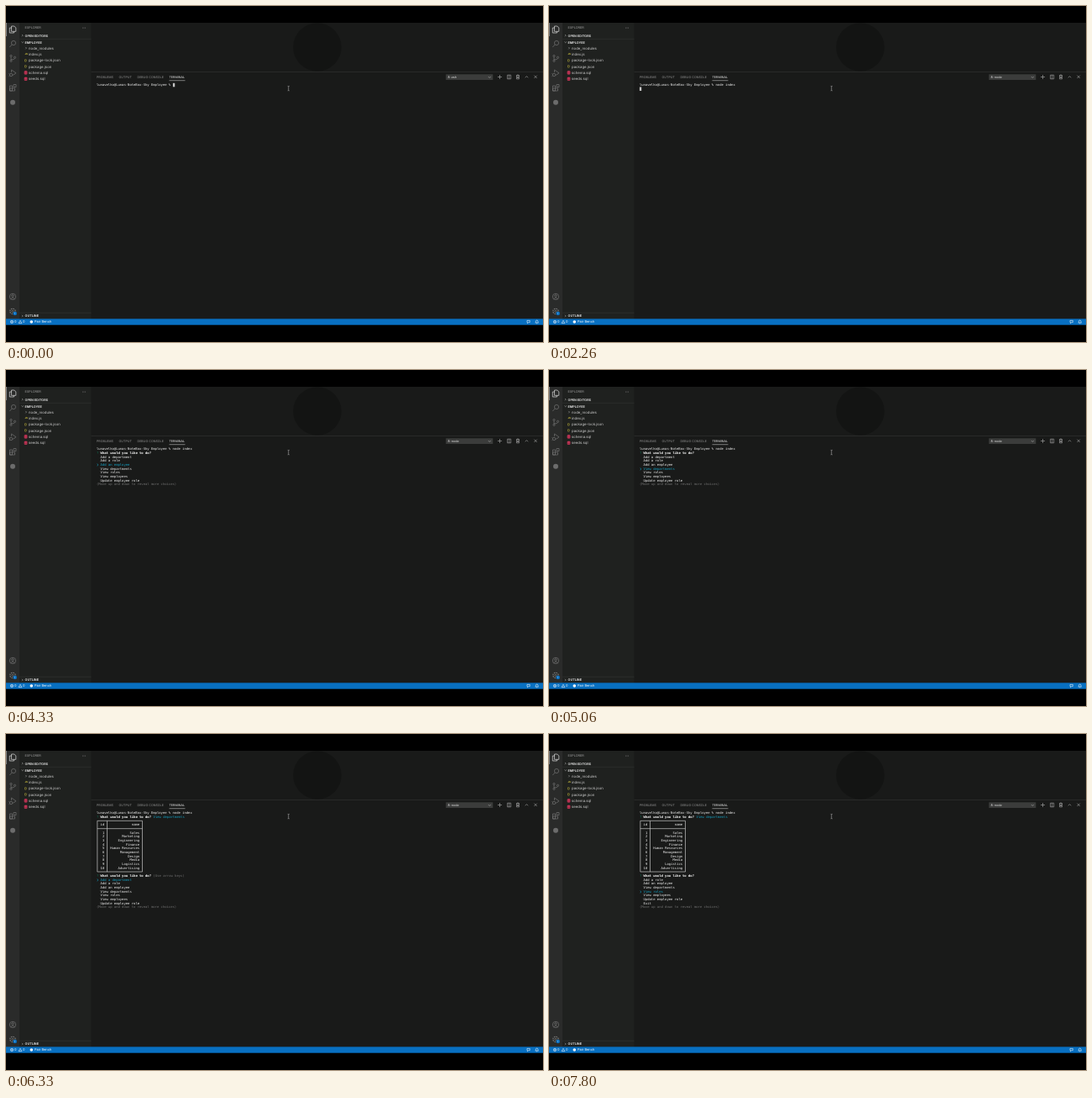
An HTML page for the animation above (8 s loop, 640 px wide and 400 px high).

```html
<!DOCTYPE html>
<html lang="en">
<head>
<meta charset="utf-8">
<title>Terminal session</title>
<style>
html, body { margin: 0; width: 100%; height: 100%; overflow: hidden; background: #000; }
svg { display: block; width: 640px; height: 400px; }
text { font-family: Inter, "Liberation Sans", sans-serif; white-space: pre; text-rendering: geometricPrecision; }
#term text { font-family: "DejaVu Sans Mono", "Liberation Mono", monospace; font-size: 3.876px; }
.icon { fill: none; stroke: #787878; stroke-width: .65; }
.lit { stroke: #e8e8e8; }
.thin { stroke: #b8b8b8; stroke-width: .55; }
</style>
</head>
<body>
<svg viewBox="0 0 640 400">
  <rect width="640" height="400"/>
  <rect y="20" width="640" height="353" fill="#191a19"/>
  <rect y="20" width="16" height="353" fill="#2a2b2a"/>
  <rect x="16" y="20" width="85.5" height="353" fill="#1f211f"/>
  <rect y="372.400" width="640" height="7.300" fill="#0870c2"/>
  <circle cx="371" cy="49" r="28.700" fill="#131413"/>
  <path d="M101.500 78.500H640M16 39.300h85.500M16 365.300h85.500" stroke="#353635" stroke-width=".6"/>

  <!-- activity bar -->
  <path d="M.3 20V36" stroke="#ddd" stroke-width=".6"/>
  <path class="icon lit" d="M6.500 24h3.300l2 2v4.300H6.500zM6.500 26H4.300v6h5.200v-1.700"/>
  <g class="icon">
    <circle cx="9" cy="44" r="2.600"/><path d="M7.200 45.900 4.300 49"/>
    <circle cx="6" cy="59.500" r="1.100"/><circle cx="6" cy="65.300" r="1.100"/><circle cx="10.500" cy="61.300" r="1.100"/>
    <path d="M6 60.600v3.600M10.500 62.400q0 1.500-4.500 1.500"/>
    <path d="M6.500 79v-3l5.500 3.800-4 2.700"/><circle cx="6" cy="82" r="1.700"/><path d="M3.500 80.500l1 .7M3.500 83.700l1-.7"/>
    <path d="M4.500 95h3v6h-3zM4.500 98h6v3h-6zM9 93.500h3v3H9z"/>
    <circle cx="8" cy="346" r="3.700"/><circle cx="8" cy="345" r="1.300"/><path d="M5.600 348.700q2.400-3 4.800 0"/>
    <circle cx="8" cy="363.500" r="1.200"/><circle cx="8" cy="363.500" r="3.200" stroke-width="1.200" stroke-dasharray="1.500 1.013"/>
  </g>
  <circle cx="8" cy="114.700" r="3" fill="#6c6c6c"/>
  <circle cx="10.700" cy="366" r="2.300" fill="#0870c2"/>

  <!-- sidebar icons -->
  <path class="icon thin" d="M19 34l1.200 1.200L19 36.400M18.500 42.500l1.200 1.200 1.200-1.200M23.300 48.900l1.200 1.200-1.200 1.200M19 367.800l1.200 1.200-1.200 1.200"/>
  <g fill="#e0365f" id="db"></g>
  <g fill="#aaa"><circle cx="91.500" cy="26" r=".4"/><circle cx="93" cy="26" r=".4"/><circle cx="94.500" cy="26" r=".4"/></g>

  <!-- panel controls -->
  <path d="M194.500 88.700h19" stroke="#ddd" stroke-width=".5"/>
  <rect x="524.300" y="81.300" width="56" height="6.700" fill="#3b3c3b"/>
  <g class="icon thin">
    <path d="M574.800 84l1.500 1.500 1.500-1.500M586 84.500h5M588.500 82v5M597.500 82.200h4.200v4.600h-4.200zM599.600 82.200v4.600"/>
    <path d="M608 82.700h4M608.500 82.700v4.200h3v-4.200M609.300 82.700v-.7h1.400v.7M609.500 84v2M610.500 84v2"/>
    <path d="M618.800 85.300l1.700-1.700 1.700 1.700M629.500 82.700l3.300 3.300M632.800 82.700l-3.300 3.300"/>
    <path d="M335.700 95.300q1 0 1 .7v4.200q0 .7-1 .7M337.700 95.300q-1 0-1 .7M337.700 100.900q-1 0-1-.7"/>
  </g>

  <!-- status bar icons -->
  <g class="icon thin" style="stroke:#fff">
    <circle cx="7" cy="376" r="1.700"/><path d="M6.300 375.300l1.400 1.400M7.700 375.300l-1.400 1.400"/>
    <path d="M17 374.300l1.900 3.300h-3.800zM621 374.400h3.300v2.200h-1.500l-1.300 1.200v-1.200h-.500z"/>
    <path d="M630.800 377.100l.6-.8v-1q.2-1.200 1.300-1.200t1.300 1.200v1l.6.8zM632.300 377.900h.9"/>
  </g>
  <circle cx="30.300" cy="376" r="1.800" fill="#fff"/>
  <g id="labels"></g>
  <text id="shell" x="526.500" y="86" font-size="3.670" fill="#e8e8e8"></text>
  <g id="term"></g>
</svg>
<script>
const $ = id => document.getElementById(id);
const LOOP = 8000, X = 107.9, Y = 94, CW = 7 / 3, LH = 14 / 3;
const CYAN = '#13a0c2', DIM = '#707070', WHITE = '#f2f2f2';

// ---- fixed labels: x, centre y, text, size, colour, weight
const label = (x, cy, s, size = 4.33, fill = '#cccccc', weight = 400) =>
  `<text x="${x}" y="${cy + size * .36}" font-size="${size}" fill="${fill}" font-weight="${weight}">${s}</text>`;
const files = ['node_modules', 'index.js', 'package-lock.json', 'package.json', 'schema.sql', 'seeds.sql'];
const fileY = i => 50.1 + i * 22 / 3;
$('labels').innerHTML =
  label(22.5, 26, 'EXPLORER', 3.75, '#a0a0a0') +
  [['OPEN EDITORS', 35.2], ['EMPLOYEE', 43.2], ['OUTLINE', 369]]
    .map(([s, y]) => label(22.5, y, s, 3.75, '#dcdcdc', 700)).join('') +
  files.map((s, i) => label(27, fileY(i), s)).join('') +
  label(22.4, fileY(1), 'JS', 2.9, '#c5b83c', 700) +
  [2, 3].map(i => label(21.7, fileY(i) - .2, '{}', 3.7, '#c5b83c', 600)).join('') +
  [[108, 'PROBLEMS'], [134.5, 'OUTPUT'], [156.5, 'DEBUG CONSOLE']]
    .map(([x, s]) => label(x, 84.8, s, 3.67, '#979797')).join('') +
  label(194.5, 84.8, 'TERMINAL', 3.67, '#f2f2f2') +
  label(10, 376, '0', 4, '#fff') + label(20, 376, '0', 4, '#fff') +
  label(34, 376, 'Pair Bench', 4, '#fff') +
  label(10, 366, '1', 2.6, '#fff');
$('db').innerHTML = [4, 5].map(i =>
  `<rect x="21.700" y="${fileY(i) - 2.1}" width="3.700" height="4.200" rx="1.200"/>` +
  `<path d="M21.700 ${fileY(i) - .6}h3.700m0 1.400h-3.700" stroke="#1f211f" stroke-width=".35"/>`).join('');

// ---- terminal
const put = (col, row, s, fill = WHITE, weight = 400) =>
  `<text x="${X + col * CW}" y="${Y + row * LH + 1.4}" fill="${fill}" font-weight="${weight}">${s}</text>`;
const cursor = (col, row) =>
  `<rect x="${X + col * CW}" y="${Y + row * LH - 2.2}" width="${CW}" height="4.500" fill="#c4c4c4"/>`;

const PROMPT = 'lunavelko@Lunas-NoteBox-Sky Employee % ', COMMAND = 'node index';
const KEYS = [400, 600, 660, 800, 930, 1130, 1330, 1400, 1600, 1730];
const ENTER = 1860, NODE = 2260, MENU = 2930, CHOSEN = 5660;
const DOWN1 = [3600, 4060, 5000], DOWN2 = [6460, 7060, 7400, 7730];
const CHOICES = ['Add a department', 'Add a role', 'Add an employee', 'View departments',
  'View roles', 'View employees', 'Update employee role', 'Exit'];
const DEPARTMENTS = ['Sales', 'Marketing', 'Engineering', 'Finance', 'Human Resources',
  'Management', 'Design', 'Media', 'Logistics', 'Advertising'];

const count = (times, t) => times.filter(k => t >= k).length;

const question = (row, note, fill) =>
  put(0, row, '?', '#0b7655') + put(2, row, 'What would you like to do?', '#fff', 700) +
  put(29, row, note, fill);

// seven visible choices; the list scrolls once the pointer reaches the fourth
function menu(row, sel) {
  const first = Math.max(0, sel - 3);
  return question(row, sel ? '' : '(Use arrow keys)', DIM) +
    CHOICES.slice(first, first + 7).map((s, i) => first + i === sel
      ? put(0, row + 1 + i, '❯', CYAN) + put(2, row + 1 + i, s, CYAN)
      : put(2, row + 1 + i, s)).join('') +
    put(0, row + 8, '(Move up and down to reveal more choices)', DIM);
}

function table(row) {
  const x = col => X + (col + .4) * CW, y = r => Y + (row + r) * LH;
  const line = (s, r) => put(22 - s.length, row + r, s);
  return `<path d="M${x(0)} ${y(0)}H${x(23)}V${y(13)}H${x(0)}zM${x(5)} ${y(0)}V${y(13)}M${x(0)} ${y(2)}H${x(23)}"
    fill="none" stroke="#c4c4c4" stroke-width=".7"/>` +
    put(2, row + 1, 'id') + line('name', 1) +
    DEPARTMENTS.map((s, i) => put(i < 9 ? 3 : 2, row + 3 + i, i + 1) + line(s, 3 + i)).join('');
}

function screen(t) {
  const typed = COMMAND.slice(0, count(KEYS, t));
  let out = put(0, 0, PROMPT + typed);
  if (t < ENTER) out += cursor(PROMPT.length + typed.length, 0);
  else if (t < MENU) out += cursor(0, 1);
  else if (t < CHOSEN) out += menu(1, count(DOWN1, t));
  else out += question(1, 'View departments', CYAN) + table(2) + menu(16, count(DOWN2, t));
  return out;
}

const EVENTS = [...KEYS, ENTER, NODE, MENU, ...DOWN1, CHOSEN, ...DOWN2];
let shown = -1;
function frame() {
  const t = performance.now() % LOOP, step = count(EVENTS, t);
  if (step !== shown) {
    shown = step;
    $('term').innerHTML = screen(t);
    $('shell').textContent = t < NODE ? '8: zsh' : '8: node';
  }
  requestAnimationFrame(frame);
}
frame();
</script>
</body>
</html>
```
